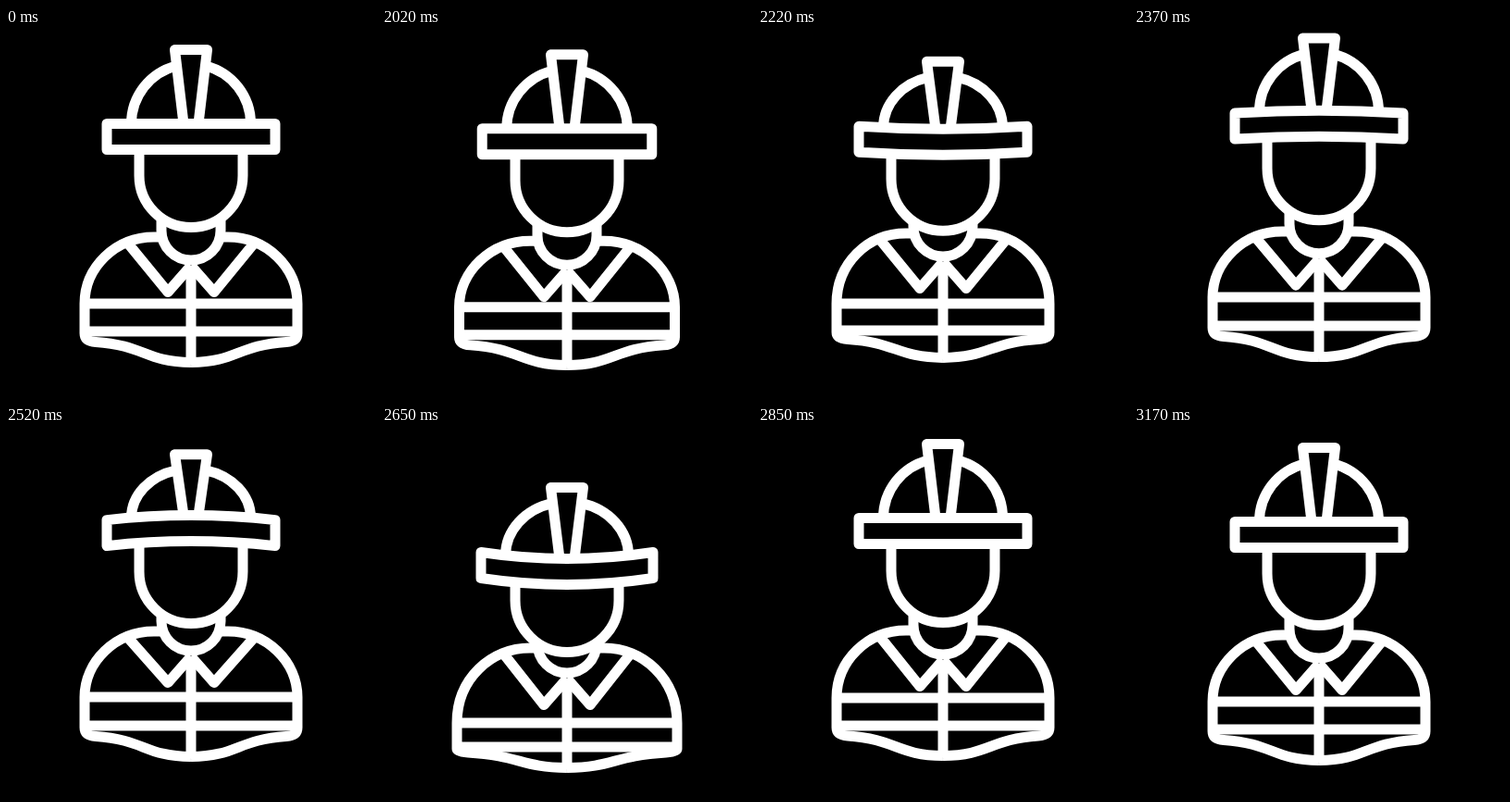
An HTML page with a canvas that plays this animation: 400x400 px, repeating every 3.2 s.

```html
<!DOCTYPE html>
<html lang="en">
<head>
<meta charset="utf-8">
<title>Worker</title>
<style>
html, body { margin: 0; height: 100%; overflow: hidden; background: #000; }
canvas { display: block; width: 100vw; height: 100vh; }
</style>
</head>
<body>
<canvas id="stage" width="400" height="400"></canvas>
<script>
const ctx = document.getElementById('stage').getContext('2d');
const LOOP = 3200, START = 2020;
const CENTER = 200;

// Vertical offsets from the resting pose; wide spreads the sides.
const parts = ['hat', 'brim', 'bend', 'head', 'shoulder', 'collar', 'band', 'belt', 'base', 'wide'];
const rest = parts.map(() => 0);
const keys = [
  [2000, rest],
  [2020, [5, 5, 0, 5, 4, 5, 3.5, 3.5, 3, 1.5]],
  [2130, [43, 33, 6, 29, 14, 16, 23, 19, 9, 3.5]],
  [2220, [13, 3, 3, 4, -4, -4, 0, -1, -5, 0]],
  [2330, [-14, -12, -2, -8, -6, -7, -7, -6, -6, 0]],
  [2520, [7, -2, -5, -2, -4, -8, -5, -4, -4, 0]],
  [2650, [43, 33, 7, 29, 14, 16, 23, 19, 8, 4]],
  [2850, [-4, -4, 0, -3, -5, -4, -4, -4, -5, 0]],
  [3050, [1, 1, 0, 1, 1, 1, 1, 1, 1, 1]],
  [3170, rest]
];

// Slope that never overshoots a key value.
function slope(k, c) {
  if (k === 0 || k === keys.length - 1) return 0;
  const rise = i => (keys[i + 1][1][c] - keys[i][1][c]) / (keys[i + 1][0] - keys[i][0]);
  const a = rise(k - 1), b = rise(k);
  return a * b > 0 ? 2 * a * b / (a + b) : 0;
}

function poseAt(t) {
  const pose = {};
  const last = keys[keys.length - 1][0];
  const still = t < START || t >= last;
  const k = still ? 0 : keys.findIndex(key => key[0] > t) - 1;
  const [t0, from] = keys[k], [t1, to] = keys[k + 1];
  const d = t1 - t0, u = (t - t0) / d;
  parts.forEach((name, c) => {
    pose[name] = still ? 0 :
      from[c] * (1 + 2 * u) * (1 - u) ** 2 + to[c] * u * u * (3 - 2 * u) +
      d * (slope(k, c) * u * (1 - u) ** 2 + slope(k + 1, c) * u * u * (u - 1));
  });
  return pose;
}

function stroke(build) {
  ctx.beginPath();
  build();
  ctx.stroke();
}

function line(...points) {
  stroke(() => points.forEach(([x, y]) => ctx.lineTo(x, y)));
}

function drawHat(p) {
  const top = 23.5 + p.hat, brim = 103.5 + p.brim, under = brim + 28;
  const half = 91 + p.wide / 2;
  const rx = 64.5 + p.wide / 2, ry = 64.5 + p.brim - p.hat + p.bend / 2;
  const domeY = brim + p.bend / 2;
  const reach = Math.acos(16 / rx);
  stroke(() => ctx.ellipse(0, domeY, rx, ry, 0, Math.PI, Math.PI + reach));
  stroke(() => ctx.ellipse(0, domeY, rx, ry, 0, -reach, 0));
  line([-8, brim + p.bend], [-17.5, top], [17.5, top], [8, brim + p.bend]);
  stroke(() => {
    ctx.moveTo(-half, brim);
    ctx.quadraticCurveTo(0, brim + 2 * p.bend, half, brim);
    ctx.lineTo(half, under);
    ctx.quadraticCurveTo(0, under + 2 * p.bend, -half, under);
    ctx.closePath();
  });
}

function drawHead(p) {
  const top = 131.5 + p.brim + p.bend / 2, mid = 159.5 + p.head;
  stroke(() => {
    ctx.moveTo(-56, top);
    ctx.lineTo(-56, mid);
    ctx.arc(0, mid, 56, Math.PI, 0, true);
    ctx.lineTo(56, top);
  });
  const neck = 219 + p.collar;
  stroke(() => {
    ctx.moveTo(-32, 206 + p.head);
    ctx.lineTo(-32, neck);
    ctx.arc(0, neck, 32, Math.PI, 0, true);
    ctx.lineTo(32, 206 + p.head);
  });
}

function drawBodySide(p, side) {
  const x = v => side * v;
  const edge = 115 + p.wide;
  const top = 226 + p.shoulder, band = 298 + p.band, belt = 328 + p.belt, base = 361.5 + p.base;
  const hem = 339.5 + (p.belt + p.base) / 2;
  stroke(() => {
    ctx.moveTo(x(33), top);
    ctx.lineTo(x(40), top);
    ctx.bezierCurveTo(x(82), top, x(edge), top + 33, x(edge), band);
    ctx.lineTo(x(edge), belt + 2);
    ctx.bezierCurveTo(x(edge), hem - 2, x(edge - 5), hem - 0.5, x(edge - 12), hem);
    ctx.bezierCurveTo(x(50), hem + 3.5, x(50), base - 0.5, 0, base);
  });
  line([x(68), 233 + p.shoulder], [x(25), 285.5 + p.collar], [0, 257 + p.collar]);
  line([0, band], [x(edge), band]);
  line([0, belt], [x(edge), belt]);
}

function draw(t) {
  const p = poseAt(t);
  ctx.setTransform(1, 0, 0, 1, 0, 0);
  ctx.fillStyle = '#000';
  ctx.fillRect(0, 0, 400, 400);
  ctx.translate(CENTER, 0);
  ctx.strokeStyle = '#fff';
  ctx.lineWidth = 11;
  ctx.lineJoin = 'round';
  ctx.lineCap = 'butt';
  drawBodySide(p, -1);
  drawBodySide(p, 1);
  line([0, 257 + p.collar], [0, 361.5 + p.base]);
  drawHead(p);
  drawHat(p);
}

const begin = performance.now();
function tick() {
  draw((performance.now() - begin) % LOOP);
  requestAnimationFrame(tick);
}
tick();
</script>
</body>
</html>
```
